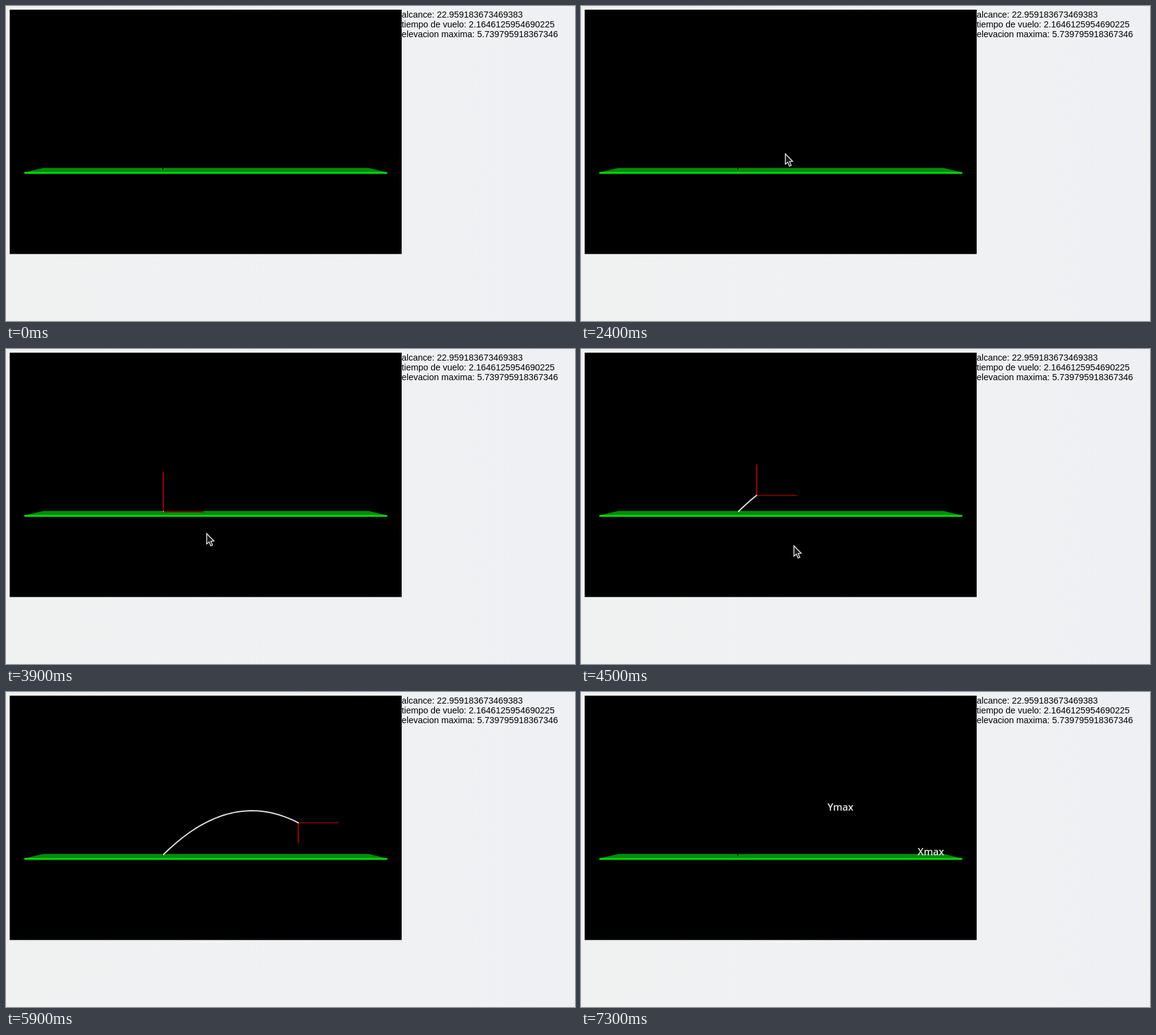
An HTML page with a canvas for the animation above (9000 ms loop, 929 by 515 pixels).

```html
<!DOCTYPE html>
<html lang="es">
<head>
<meta charset="utf-8">
<title>Tiro parabólico</title>
<style>
  html, body { margin: 0; width: 100%; height: 100%; overflow: hidden; }
  body { position: relative; background: linear-gradient(90deg, #f0f2f2, #f0f1f3 70%, #eff0f3); }
  canvas { position: absolute; left: 0; top: 0; }
  #info {
    position: absolute; left: 646px; top: 6px; white-space: nowrap; color: #000;
    font: 14.4px/16px "Liberation Sans", Arial, sans-serif;
  }
</style>
</head>
<body>
<canvas id="stage" width="929" height="515"></canvas>
<div id="info">alcance: 22.959183673469383<br>tiempo de vuelo: 2.1646125954690225<br>elevacion maxima: 5.739795918367346</div>
<script>
const ctx = document.getElementById('stage').getContext('2d');

const LOOP = 9000, STEP = 100;
const SHOW = 3900, LAUNCH = 4280, FLIGHT = 2120, LABELS = 6900;
const X0 = 256.8, Y0 = 266, RANGE = 288.5, HEIGHT = 71.5, ARROW = 67;

// time, x, y of the pointer tip
const pointerPath = [
  [2400, 333, 241], [3000, 327, 307], [3200, 327, 307], [3500, 327, 301],
  [3900, 327, 301], [4500, 347, 321], [4700, 903, 347], [4800, 940, 349]
];
const pointerShape = [[0, 0], [0, 17], [4, 13.5], [6.7, 20], [9.6, 18.8], [7, 12.6], [12, 12.2]];

const clamp = v => Math.max(0, Math.min(1, v));
const ballX = p => X0 + RANGE * p;
const ballY = p => Y0 - 4 * HEIGHT * p * (1 - p) - 0.8 * p;

function polygon(points, fill) {
  ctx.beginPath();
  points.forEach(([x, y]) => ctx.lineTo(x, y));
  ctx.closePath();
  ctx.fillStyle = fill;
  ctx.fill();
}

function scene() {
  ctx.fillStyle = '#000';
  ctx.fillRect(6, 6, 640, 399.5);
  polygon([[30, 272], [61, 264.7], [592, 264.7], [622, 272]], '#008c08');
  ctx.fillStyle = '#06dc0a';
  ctx.fillRect(30, 271.4, 592.5, 3);
  ctx.fillStyle = '#012801';
  ctx.fillRect(255, 265, 2, 2.5);
}

function arrow(x, y, dx, dy, color, width) {
  const len = Math.hypot(dx, dy);
  if (len < 1) return;
  const ux = dx / len, uy = dy / len;
  const head = Math.min(4, len / 3), half = width / 2 + 0.5;
  const bx = x + dx - ux * head, by = y + dy - uy * head;
  ctx.strokeStyle = color;
  ctx.lineWidth = width;
  ctx.lineCap = 'butt';
  ctx.beginPath();
  ctx.moveTo(x, y);
  ctx.lineTo(bx, by);
  ctx.stroke();
  polygon([[bx - uy * half, by + ux * half], [x + dx, y + dy], [bx + uy * half, by - ux * half]], color);
}

function projectile(t) {
  const p = clamp((t - LAUNCH) / FLIGHT);
  const x = ballX(p), y = ballY(p), vy = 1 - 2 * p;
  if (Math.abs(vy) < 0.1) {
    ctx.fillStyle = '#380000';
    ctx.fillRect(x, y - 2, ARROW, 6);
  }
  arrow(x, y, ARROW, 0, '#780604', 2);
  arrow(x, y, 0, -(ARROW - 1) * vy, '#840a04', 2.6);

  ctx.strokeStyle = '#e4e4e4';
  ctx.lineWidth = 2;
  ctx.lineCap = 'round';
  ctx.beginPath();
  ctx.moveTo(X0, Y0);
  const n = Math.max(1, Math.ceil(p * 60));
  for (let i = 1; i <= n; i++) ctx.lineTo(ballX(p * i / n), ballY(p * i / n));
  ctx.stroke();
}

function labels() {
  ctx.font = '600 16px "Open Sans", "Noto Sans", sans-serif';
  ctx.fillStyle = '#e6e6e6';
  ctx.fillText('Ymax', 402.5, 194);
  ctx.fillText('Xmax', 549.5, 267);
}

function pointer(t) {
  const i = pointerPath.findIndex(k => k[0] > t);
  if (i < 1) return;
  const [t0, xa, ya] = pointerPath[i - 1], [t1, xb, yb] = pointerPath[i];
  const k = (t - t0) / (t1 - t0);
  ctx.save();
  ctx.translate(xa + (xb - xa) * k + 0.6, ya + (yb - ya) * k + 0.8);
  polygon(pointerShape, '#1c1c1c');
  ctx.strokeStyle = '#e8e8e8';
  ctx.lineWidth = 1.4;
  ctx.lineJoin = 'miter';
  ctx.stroke();
  ctx.restore();
}

function draw(now) {
  const t = Math.floor((now % LOOP) / STEP) * STEP;
  ctx.clearRect(0, 0, 929, 515);
  scene();
  if (t >= SHOW && t < LABELS) projectile(t);
  if (t >= LABELS) labels();
  pointer(t);
}

const start = performance.now();
function tick() {
  draw(performance.now() - start);
  requestAnimationFrame(tick);
}
tick();
</script>
</body>
</html>
```
